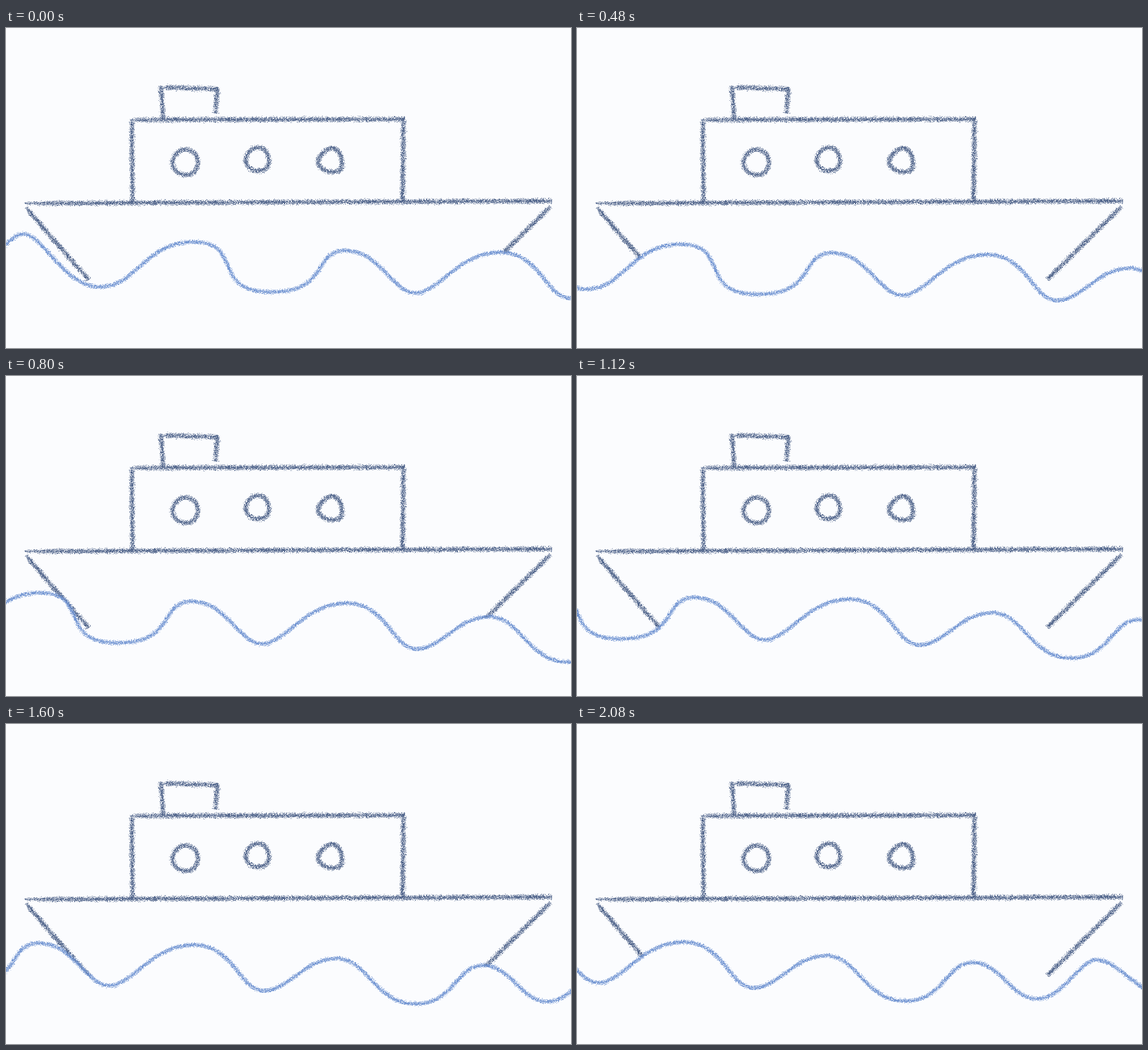
These frames come from a looping animation (994 px wide and 563 px high, 2.24 s). An HTML page with a canvas:

```html
<!DOCTYPE html>
<html lang="en">
<head>
<meta charset="utf-8">
<title>Chalk boat</title>
<style>
  html, body { margin: 0; width: 100%; height: 100%; overflow: hidden; background: #fbfcfe; }
  canvas { display: block; width: 994px; height: 563px; }
</style>
</head>
<body>
<canvas id="stage" width="994" height="563"></canvas>
<script>
const W = 994, H = 563, SWELL = 1700, STEP = 160, STEPS = 14;
const stage = document.getElementById('stage').getContext('2d');

// Crests and troughs of one long swell: x, y, and how far each stays flat.
const turns = [
  [-90, 455, 50], [30, 362, 35], [165, 455, 65], [330, 376, 88], [465, 464, 106],
  [597, 391, 60], [720, 466, 40], [868, 394, 72], [992, 475, 42], [1120, 418, 55],
  [1258, 498, 70], [1378, 430, 48], [1491, 494, 46], [1597, 425, 32], [1720, 492, 40]
];

// Where the pace of the swell changes: step, distance to the left, drop.
const pace = [[0, 0, 0], [2, 87, 3], [5, 270, 5], [7, 390, -2], [10, 539, -6], [13, 682, -11]];

// Straight strokes of the boat: x0, y0, x1, y1.
const strokes = [
  [32, 308, 960, 304], [34, 315, 145, 443], [958, 313, 827, 442],
  [221, 160, 222, 306], [221, 161, 701, 160], [699, 157, 697, 305],
  [272, 101, 276, 159], [277, 104, 373, 107], [372, 106, 368, 150]
];

// Portholes: centre, radius, unevenness.
const portholes = [[315, 236, 22.5, 0.01], [442, 231, 20.8, 0.04], [571, 233, 21, 0.08]];

const navy = { colors: ['#41567f', '#4f638a', '#5f7397'], density: 12, spread: 4.5 };
const blue = { colors: ['#6288cc', '#7094d2', '#82a2d9'], density: 11, spread: 3.8 };

let seed = 7;
function rnd() {
  seed = (seed * 1664525 + 1013904223) >>> 0;
  return seed / 4294967296;
}

const mix = (a, b, t) => a + (b - a) * t;

function swellCurve() {
  const pts = [];
  for (let i = 1; i < turns.length; i++) {
    const [x0, y0, flat0] = turns[i - 1], [x1, y1, flat1] = turns[i];
    for (let k = 0; k < 40; k++) {
      const t = k / 40, u = 1 - t;
      const a = u * u * u, b = 3 * u * u * t, c = 3 * u * t * t, d = t * t * t;
      pts.push([a * x0 + b * (x0 + flat0) + c * (x1 - flat1) + d * x1,
                (a + b) * y0 + (c + d) * y1]);
    }
  }
  return pts;
}

function ring(cx, cy, radius, dent) {
  const pts = [];
  for (let deg = 0; deg <= 360; deg += 6) {
    const a = deg * Math.PI / 180;
    const r = radius * (1 - dent * Math.cos(3 * (a - 1.25 * Math.PI)));
    pts.push([cx + r * Math.cos(a), cy + r * Math.sin(a)]);
  }
  return pts;
}

function layer(width) {
  const c = document.createElement('canvas');
  c.width = width;
  c.height = H;
  return c.getContext('2d');
}

// Scatter grains across the path, densest along its middle, fading in over `lead` pixels.
function chalk(ctx, pts, ink, lead = 0) {
  let run = 0;
  for (let i = 1; i < pts.length; i++) {
    const [x0, y0] = pts[i - 1], [x1, y1] = pts[i];
    const len = Math.hypot(x1 - x0, y1 - y0);
    const nx = (y0 - y1) / len, ny = (x1 - x0) / len;
    for (let k = Math.floor(len * ink.density + rnd()); k > 0; k--) {
      const t = rnd();
      const press = lead ? Math.min(1, 0.25 + (run + t * len) / lead) : 1;
      if (rnd() > press) continue;
      const off = (rnd() + rnd() + rnd() - 1.5) * ink.spread * mix(0.5, 1, press);
      ctx.globalAlpha = mix(0.45, 0.95, rnd());
      ctx.fillStyle = ink.colors[Math.floor(rnd() * ink.colors.length)];
      ctx.fillRect(Math.round(mix(x0, x1, t) + nx * off),
                   Math.round(mix(y0, y1, t) + ny * off), 1, 1);
    }
    run += len;
  }
}

const boat = layer(W), water = layer(SWELL);
for (const [x0, y0, x1, y1] of strokes) {
  chalk(boat, [[x0, y0], [x1, y1]], navy, 0.07 * Math.hypot(x1 - x0, y1 - y0));
}
for (const hole of portholes) chalk(boat, ring(...hole), navy);

const surface = swellCurve();
chalk(water, surface, blue);

function swellOffset(step) {
  const i = Math.max(1, pace.findIndex(p => p[0] >= step));
  const [s0, x0, y0] = pace[i - 1], [s1, x1, y1] = pace[i];
  const t = (step - s0) / (s1 - s0);
  return [-Math.round(mix(x0, x1, t)), Math.round(mix(y0, y1, t))];
}

function draw(step) {
  const [dx, dy] = swellOffset(step);
  stage.clearRect(0, 0, W, H);

  // The hull shows only above the water.
  stage.save();
  stage.beginPath();
  stage.moveTo(surface[0][0] + dx, 0);
  for (const [x, y] of surface) stage.lineTo(x + dx, y + dy + 2);
  stage.lineTo(SWELL + 20 + dx, 0);
  stage.clip();
  stage.drawImage(boat.canvas, 0, 0);
  stage.restore();

  stage.drawImage(water.canvas, dx, dy);
}

const start = performance.now();
let shown = -1;
function tick() {
  const step = Math.floor((performance.now() - start) / STEP) % STEPS;
  if (step !== shown) draw(shown = step);
  requestAnimationFrame(tick);
}
tick();
</script>
</body>
</html>
```
